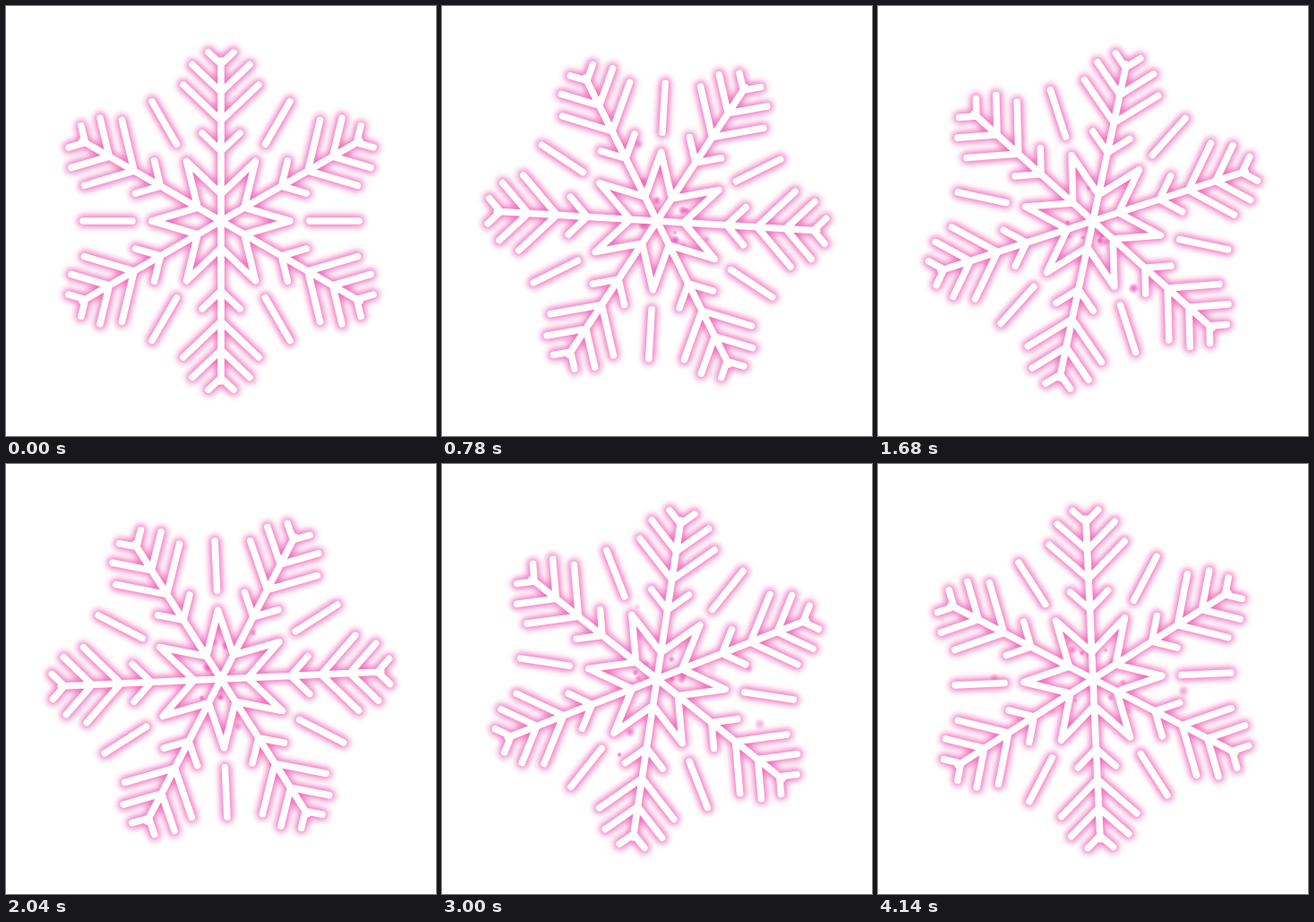
An HTML page for the animation above (4.2 s loop, 480 by 480 pixels).

```html
<!DOCTYPE html>
<html lang="en">
<head>
<meta charset="utf-8">
<title>Neon snowflake</title>
<style>
  html, body { margin: 0; width: 100%; height: 100%; overflow: hidden; background: #fff; }
  svg { display: block; width: 100vw; height: 100vh; }
  path { fill: none; stroke-linecap: round; stroke-linejoin: round; }
</style>
</head>
<body>
<svg viewBox="0 0 480 480">
  <defs>
    <filter id="blur" filterUnits="userSpaceOnUse" x="-240" y="-240" width="480" height="480" color-interpolation-filters="sRGB">
      <feGaussianBlur stdDeviation="3.8"/>
    </filter>
    <radialGradient id="speck">
      <stop offset="0" stop-color="#ee48ae"/>
      <stop offset=".4" stop-color="#ee48ae" stop-opacity=".7"/>
      <stop offset="1" stop-color="#ee48ae" stop-opacity="0"/>
    </radialGradient>
  </defs>
  <g transform="translate(240 240)">
    <g class="flake"><path class="shape" stroke="#f272bd" stroke-width="13" filter="url(#blur)"/></g>
    <g id="specks"></g>
    <g class="flake"><path class="shape" stroke="#fff" stroke-width="7.6"/></g>
  </g>
</svg>
<script>
const LOOP = 4200, STEP = 60, LIFE = 780, SPECKS = 110;
const flakes = document.querySelectorAll('.flake');
const layer = document.getElementById('specks');

// Joins [radius, angle] points, turned by a sector angle, into one line.
const line = (turn, ...points) => 'M' + points.map(([r, deg]) => {
  const a = (deg + turn) * Math.PI / 180;
  return `${(r * Math.sin(a)).toFixed(2)} ${(-r * Math.cos(a)).toFixed(2)}`;
}).join('L');

// A pair of twigs leaving the arm at about 45 degrees.
function twigs(turn, root, spread) {
  const rise = root + spread * .95;
  const r = Math.hypot(spread, rise);
  const a = Math.atan2(spread, rise) * 180 / Math.PI;
  return line(turn, [r, -a], [root, 0], [r, a]);
}

function sector(turn) {
  return line(turn, [0, 0], [179, 0]) +
    twigs(turn, 78, 21) + twigs(turn, 112, 42) +
    twigs(turn, 144, 32) + twigs(turn, 175, 14) +
    line(turn, [99, 30], [154, 30]) +
    line(turn, [30, 0], [77, 30], [30, 60]);
}

const outline = Array.from({ length: 6 }, (_, i) => sector(i * 60)).join('');
document.querySelectorAll('.shape').forEach(p => p.setAttribute('d', outline));

let seed = 41;
const random = () => (seed = (seed * 16807) % 2147483647) / 2147483647;

// Dust thrown from the centre; only a few specks get far.
const specks = Array.from({ length: SPECKS }, (_, i) => {
  const node = document.createElementNS('http://www.w3.org/2000/svg', 'circle');
  node.setAttribute('fill', 'url(#speck)');
  layer.append(node);
  return {
    node,
    birth: 30 + i * LOOP / SPECKS,
    angle: random() * 2 * Math.PI,
    reach: 45 + 160 * random() ** 5,
    size: 3 + 4 * random(),
    strength: .45 + .4 * random()
  };
});

function draw(time) {
  const t = Math.floor(time % LOOP / STEP) * STEP;
  flakes.forEach(f => f.setAttribute('transform', `rotate(${180 * t / LOOP})`));
  for (const { node, birth, angle, reach, size, strength } of specks) {
    const age = (t - birth) / LIFE;
    const alive = age > 0 && age < 1;
    node.setAttribute('opacity', alive ? strength * Math.min(1, age * 6, (1 - age) * 2) : 0);
    if (!alive) continue;
    const distance = 8 + reach * age;
    node.setAttribute('cx', Math.cos(angle) * distance);
    node.setAttribute('cy', Math.sin(angle) * distance);
    node.setAttribute('r', size * (.8 + .4 * age));
  }
}

const start = performance.now();
function tick() {
  draw(performance.now() - start);
  requestAnimationFrame(tick);
}
tick();
</script>
</body>
</html>
```
